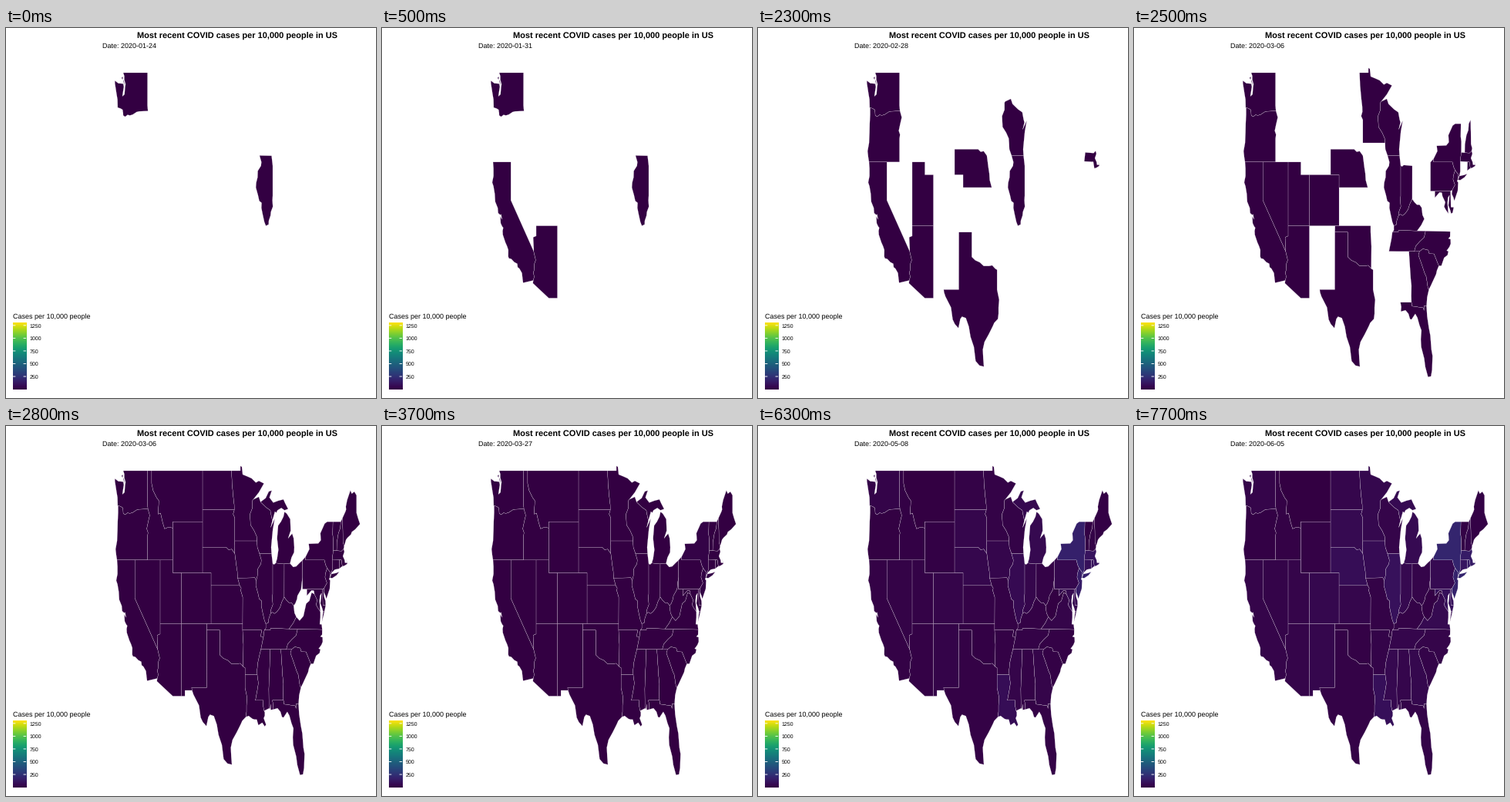
A matplotlib script that plays this animation: 480x480 px, repeating every 8000 ms.

```python
import math

import matplotlib
import matplotlib.pyplot as plt
import numpy as np
from matplotlib.animation import FuncAnimation
from matplotlib.colors import ListedColormap
from matplotlib.patches import Polygon

SIZE, STEP, FRAMES = 480, 100, 80
WEEK_MS, LAST_WEEK, TOP = 400, 19, 1305
START = np.datetime64("2020-01-24")

plt.rcParams["font.family"] = "Liberation Sans"
plt.rcParams["text.hinting"] = "none"
plt.rcParams["text.hinting_factor"] = 1

# viridis, darkened by a display gamma of 2.2 / 1.8
viridis = matplotlib.colormaps["viridis"](np.linspace(0, 1, 512))[:, :3]
cmap = ListedColormap(viridis ** (2.2 / 1.8))

fig = plt.figure(figsize=(SIZE / 72, SIZE / 72), dpi=72, facecolor="white")
ax = fig.add_axes([0, 0, 1, 1])
ax.axis("off")

states = []


def pts(*v):
    """Pairs of degrees west and degrees north."""
    return np.reshape(v, (-1, 2))


def project(p):
    return np.column_stack([183.5 + (117.04 - p[:, 0]) * 5.507,
                            58 + (49 - p[:, 1]) * 16.55])


def add(first, total, mid, *parts, islands=()):
    """A state with its first week, final rate and week of fastest growth."""
    for shape in (np.concatenate(parts), *islands):
        patch = Polygon(project(shape), closed=True, lw=0.2, ec="white", snap=False)
        ax.add_patch(patch)
        states.append((patch, first, total, mid))


def rate(week, total, mid):
    spread = 2 + 0.42 * (mid - 10.5)
    grow = lambda w: math.exp(-math.exp((mid - w) / spread))
    return total * grow(week) / grow(LAST_WEEK)


# Shared borders, mostly rivers
columbia = pts(124.05, 46.27, 123.4, 46.2, 122.9, 46.1, 122.78, 45.85, 122.75, 45.65,
               122.3, 45.55, 121.7, 45.7, 121.2, 45.65, 120.5, 45.72, 119.6, 45.92,
               119, 45.97, 116.92, 46)
snake = pts(116.92, 46, 116.5, 45.5, 116.85, 45, 117.2, 44.45, 116.9, 44.15,
            117.03, 43.83, 117.03, 42)
colorado = pts(114.63, 35, 114.14, 34.3, 114.43, 34.05, 114.53, 33.5, 114.7, 33.35,
               114.5, 33, 114.72, 32.72)
mead = pts(114.63, 35, 114.6, 35.1, 114.75, 36.1, 114.04, 36.2)
bitterroot = pts(116.05, 48, 115.7, 47.45, 114.9, 46.9, 114.35, 46.65, 114.5, 45.6,
                 113.95, 45.68, 113.45, 44.95, 113, 44.45, 112.3, 44.55, 111.5, 44.55,
                 111.05, 44.5)
red_north = pts(97.23, 49, 97.1, 48, 96.83, 47, 96.6, 46.35, 96.56, 45.94)
traverse = pts(96.56, 45.94, 96.85, 45.6, 96.45, 45.3, 96.45, 43.5)
sioux = pts(96.45, 43.5, 96.55, 43.1, 96.45, 42.5)
niobrara = pts(96.45, 42.5, 97.2, 42.85, 97.9, 42.8, 98.5, 43)
missouri = pts(96.45, 42.5, 96.25, 42, 96.1, 41.6, 95.87, 41.1, 95.77, 40.58)
missouri_low = pts(95.3, 40, 94.95, 39.8, 95.05, 39.6, 94.6, 39.1)
red_south = pts(94.48, 33.64, 95.2, 33.9, 95.9, 33.85, 96.6, 33.85, 97.2, 33.85,
                98.1, 34.13, 99.2, 34.3, 100, 34.56)
sabine = pts(94.04, 31.99, 93.55, 31.2, 93.7, 30.6, 93.7, 30.1, 93.85, 29.7)
croix = pts(92.1, 46.75, 92.29, 46.66, 92.29, 46.1, 92.87, 45.6, 92.75, 44.75,
            91.9, 44.3, 91.3, 43.85, 91.22, 43.5)
miss_wi = pts(91.22, 43.5, 91.15, 43, 90.64, 42.51)
miss_ia = pts(90.64, 42.51, 90.2, 42, 90.3, 41.7, 91.05, 41.3, 91.1, 40.8, 91.42, 40.38)
miss_il = pts(91.42, 40.38, 91.5, 40, 91, 39.4, 90.7, 38.95, 90.15, 38.8, 90.2, 38.4,
              89.9, 37.9, 89.5, 37.3, 89.15, 37)
miss_ky = pts(89.15, 37, 89.15, 36.65, 89.5, 36.5)
miss_tn = pts(89.5, 36.5, 89.7, 36, 90.3, 35)
miss_ar = pts(90.3, 35, 90.6, 34.6, 91, 34, 91.2, 33.4, 91.17, 33)
miss_la = pts(91.17, 33, 90.9, 32.35, 91.1, 31.9, 91.6, 31, 89.73, 31, 89.8, 30.6,
              89.55, 30.18)
bootheel = pts(89.7, 36, 90.37, 36, 90.15, 36.5, 94.62, 36.5)
menominee = pts(90.4, 46.55, 89.1, 46.13, 88.1, 45.9, 87.8, 45.35, 87.6, 45.1)
wabash = pts(87.53, 41.71, 87.53, 39.35, 87.6, 39, 87.5, 38.5, 87.95, 38.1, 88.05, 37.8)
ohio_il = pts(88.05, 37.8, 88.45, 37.4, 88.5, 37.1, 89.15, 37)
ohio_in = pts(84.82, 39.1, 85.4, 38.7, 85.8, 38.27, 86.5, 37.95, 87.1, 37.8, 87.6, 37.9,
              88.05, 37.8)
ohio_ky = pts(82.6, 38.42, 83.1, 38.65, 83.7, 38.65, 84.3, 38.85, 84.82, 39.1)
ohio_wv = pts(80.52, 40.64, 80.65, 40.3, 80.85, 39.7, 81.7, 39.2, 81.8, 38.95, 82.2, 38.6,
              82.6, 38.42)
sandy = pts(82.6, 38.42, 82.4, 37.85, 81.97, 37.54)
cumberland = pts(81.97, 37.54, 82.7, 37.05, 83.68, 36.6)
ky_tn = pts(83.68, 36.6, 88.07, 36.65, 88.07, 36.5, 89.5, 36.5)
smoky = pts(81.68, 36.59, 82, 36.1, 83.1, 35.75, 84, 35.4, 84.32, 34.99)
savannah = pts(83.1, 35, 83.35, 34.7, 82.6, 34, 81.9, 33.3, 81.5, 33, 81.1, 32.1,
               80.87, 32.03)
carolina = pts(83.1, 35, 82.3, 35.2, 81.05, 35.1, 80.8, 34.82, 79.68, 34.8, 78.55, 33.86)
tombigbee = pts(88.2, 34.99, 88.1, 34.9, 88.45, 31.9, 88.4, 30.37)
chatta = pts(85.6, 34.99, 85.18, 32.87, 85, 32.3, 85.05, 31.5, 85, 31)
marys = pts(85, 31, 84.86, 30.7, 82.2, 30.57, 82.05, 30.36, 82, 30.75, 81.45, 30.7)
perdido = pts(87.6, 31, 87.4, 30.65, 87.5, 30.28)
allegheny = pts(77.7, 39.32, 78.35, 39.45, 78.9, 38.8, 79.65, 38.58, 80.3, 37.6,
                81.2, 37.25, 81.97, 37.54)
potomac = pts(76.3, 37.95, 77, 38.3, 77.3, 38.5, 77.04, 38.85, 77.7, 39.32)
potomac_wv = pts(77.7, 39.32, 77.85, 39.6, 78.4, 39.62, 79.48, 39.2, 79.48, 39.72)
delaware = pts(74.7, 41.36, 75.1, 40.95, 75.2, 40.65, 74.75, 40.2, 75.4, 39.8)
delaware_up = pts(79.76, 42, 75.35, 42, 75.05, 41.6, 74.7, 41.36)
champlain = pts(73.35, 45, 73.4, 44, 73.25, 43.6, 73.27, 42.75)
taconic = pts(73.27, 42.75, 73.5, 42.05)
ct_ny = pts(73.5, 42.05, 73.5, 41.25, 73.65, 41)
ct_river = pts(71.5, 45, 71.6, 44.5, 72.05, 44.1, 72.4, 43.4, 72.46, 42.73)
merrimack = pts(72.46, 42.73, 71.3, 42.7, 70.82, 42.87)
nh_me = pts(71.08, 45.3, 71, 44.3, 70.97, 43.4, 70.7, 43.08)

# West
add(0, 31, 11.2, pts(117.03, 49, 117.04, 46.43), columbia[::-1],
    pts(124.1, 46.9, 124.35, 47.4, 124.7, 48.15, 124.72, 48.38, 123.9, 48.17, 123.1, 48.15,
        122.75, 48.13, 122.6, 47.9, 122.95, 47.15, 122.45, 47.3, 122.3, 47.9, 122.2, 48.1,
        122.5, 48.45, 122.5, 48.75, 122.75, 49),
    islands=(pts(122.75, 48.4, 122.6, 48.4, 122.4, 47.95, 122.55, 48.1),
             pts(123.15, 48.6, 122.8, 48.7, 122.9, 48.45)))
add(5, 11, 12.5, columbia, snake,
    pts(124.21, 42, 124.4, 42.4, 124.55, 42.85, 124.2, 43.5, 124.1, 44.3, 124.05, 45,
        123.95, 45.7, 123.95, 46.2))
add(1, 32, 14, pts(124.21, 42, 120, 42, 120, 39), colorado,
    pts(117.12, 32.53, 117.25, 32.85, 117.4, 33.3, 118, 33.65, 118.4, 33.75, 118.5, 34.03,
        119.2, 34.15, 119.9, 34.4, 120.47, 34.45, 120.63, 34.6, 120.6, 35.1, 120.9, 35.4,
        121.3, 35.7, 121.9, 36.3, 121.95, 36.6, 121.8, 36.85, 122.05, 36.95, 122.4, 37.2,
        122.5, 37.75, 122.1, 37.5, 122.3, 37.9, 122.5, 37.85, 123, 38, 123.1, 38.4,
        123.7, 38.9, 123.8, 39.5, 124.1, 40.1, 124.4, 40.4, 124.1, 40.9, 124.1, 41.5))
add(6, 30, 12.5, pts(120, 42, 114.04, 42), mead[::-1], pts(120, 39))
add(1, 34, 14.5, pts(114.04, 37, 109.05, 37, 109.05, 31.33, 111.07, 31.33, 114.82, 32.5),
    colorado[::-1], mead)
add(5, 35, 13.8, pts(114.04, 42, 111.05, 42, 111.05, 41, 109.05, 41, 109.05, 37, 114.04, 37))
add(7, 17, 11.5, pts(117.03, 49, 116.05, 49), bitterroot, pts(111.05, 42), snake[::-1],
    pts(117.04, 46.43))
add(7, 5, 11, bitterroot, pts(111.05, 45, 104.05, 45, 104.05, 49, 116.05, 49))
add(7, 16, 12.5, pts(111.05, 45, 104.05, 45, 104.05, 41, 111.05, 41))
add(6, 48, 13, pts(109.05, 41, 102.05, 41, 102.05, 37, 109.05, 37))
add(7, 41, 13.7, pts(109.05, 37, 103, 37, 103.04, 36.5, 103.06, 32, 106.62, 32,
                     106.53, 31.78, 108.21, 31.78, 108.21, 31.33, 109.05, 31.33))

# Plains
add(7, 36, 14, red_north, pts(104.05, 45.94, 104.05, 49))
add(7, 59, 13.5, traverse, sioux, niobrara, pts(104.05, 43, 104.05, 45.94))
add(4, 78, 14.5, niobrara[::-1], missouri, pts(95.3, 40, 102.05, 40, 102.05, 41,
                                               104.05, 41, 104.05, 43))
add(7, 36, 14, missouri_low, pts(94.62, 37, 102.05, 37, 102.05, 40))
add(6, 18, 13, pts(103, 37, 94.62, 37, 94.62, 36.5, 94.43, 35.4), red_south,
    pts(100, 36.5, 103.04, 36.5))
add(3, 25, 13.8, pts(103.04, 36.5, 100, 36.5), red_south[::-1], pts(94.04, 33.55), sabine,
    pts(94.7, 29.4, 95.1, 29.1, 96, 28.5, 97, 27.9, 97.4, 27.3, 97.3, 26.6, 97.15, 25.96,
        98.2, 26.05, 99.1, 26.4, 99.5, 27.5, 100.3, 28.3, 100.7, 29.1, 101.4, 29.77,
        102.3, 29.88, 102.7, 29.7, 103.15, 28.98, 104, 29.3, 104.5, 29.65, 104.9, 30.6,
        106.2, 31.45, 106.53, 31.78, 106.62, 32, 103.06, 32))

# Middle
add(6, 48, 15, red_north[::-1],
    pts(95.15, 49, 95.15, 49.38, 94.8, 49.3, 94.6, 48.7, 93.5, 48.55, 92.5, 48.4,
        91.5, 48.07, 90.8, 48.2, 89.6, 48, 90.8, 47.3), croix, traverse[::-1])
add(7, 67, 14.3, miss_wi, miss_ia, pts(91.73, 40.61), missouri[::-1], sioux[::-1])
add(7, 24, 12.5, pts(95.77, 40.58, 91.73, 40.61), miss_il, miss_ky, bootheel,
    pts(94.62, 37), missouri_low[::-1])
add(7, 29, 14, bootheel, pts(94.43, 35.4, 94.48, 33.64, 94.04, 33.55, 94.04, 33.02),
    miss_ar[::-1])
add(7, 90, 11.1, pts(94.04, 33.02), miss_la,
    pts(89.4, 30.05, 89.4, 29.8, 89.65, 29.6, 89.1, 29.1, 89.4, 28.95, 90, 29.25,
        90.9, 29.05, 91.3, 29.5, 91.8, 29.5, 92.3, 29.55, 93.2, 29.78), sabine[::-1])
add(2, 35, 13.8, croix, miss_wi,
    pts(87.8, 42.49, 87.9, 43, 87.7, 43.7, 87.5, 44.4, 87.05, 45.25, 88, 44.55),
    menominee[::-1], pts(90.8, 46.95))
add(0, 99, 13.3, pts(87.8, 42.49), wabash, ohio_il, miss_il[::-1], miss_ia[::-1])
add(6, 54, 13, wabash[::-1], pts(87.2, 41.65, 86.82, 41.76, 84.81, 41.7), ohio_in)
add(7, 64, 11.4,
    pts(86.82, 41.76, 86.5, 42.1, 86.2, 42.8, 86.5, 43.7, 86.25, 44.7, 85.6, 45, 85, 45.4,
        84.75, 45.78, 84.2, 45.63, 83.4, 45.2, 83.3, 44.3, 83.9, 43.7, 83.4, 43.9,
        82.95, 44.07, 82.6, 43.7, 82.45, 43, 82.5, 42.6, 83.1, 42.2, 83.45, 41.73,
        84.81, 41.7),
    islands=(np.concatenate([menominee, pts(
        87, 45.8, 86.7, 45.7, 86.4, 45.9, 85.5, 46.08, 84.75, 45.9, 83.9, 46, 84.6, 46.45,
        85, 46.75, 86.2, 46.65, 87.4, 46.5, 88.3, 46.9, 87.75, 47.45, 88.45, 47.37,
        89.2, 46.85)]),))
add(7, 32, 13, pts(84.81, 41.7, 83.45, 41.73, 82.7, 41.45, 82, 41.5, 81.2, 41.77,
                   80.52, 41.98), ohio_wv, ohio_ky)
add(6, 24, 13, ohio_ky[::-1], sandy, cumberland, ky_tn, miss_ky[::-1], ohio_il[::-1],
    ohio_in[::-1])
add(6, 37, 13.2, ky_tn, miss_tn, pts(88.2, 34.99), smoky[::-1])

# South
add(7, 56, 13.7, miss_ar, miss_la, tombigbee[::-1])
add(7, 40, 13.7, tombigbee,
    pts(88.15, 30.35, 88, 30.7, 88, 30.25), perdido[::-1], chatta[::-1])
add(6, 47, 12.8, pts(84.32, 34.99), savannah, pts(81.3, 31.4), marys[::-1], chatta[::-1])
add(6, 28, 12.4, perdido[::-1], marys,
    pts(81.3, 29.9, 80.9, 29, 80.55, 28.4, 80.3, 27.3, 80.03, 26.8, 80.15, 25.7, 80.4, 25.2,
        81.1, 25.15, 81.75, 25.95, 82, 26.6, 82.7, 27.5, 82.8, 28.1, 82.65, 28.8,
        83.1, 29.2, 83.6, 29.8, 84.1, 30.1, 85, 29.65, 85.35, 29.7, 85.7, 30.1,
        86.4, 30.38))
add(6, 26, 13, carolina, pts(79, 33.5, 79.2, 33.2, 79.9, 32.7, 80.45, 32.3), savannah[::-1])
add(6, 32, 14.2, smoky, carolina,
    pts(77.95, 33.87, 77.3, 34.5, 76.5, 34.7, 76.3, 35, 76.7, 35.05, 76.05, 35.35,
        75.75, 35.6, 75.8, 35.95, 76.3, 36, 75.9, 36.15, 75.87, 36.55))

# East
add(7, 57, 14, pts(83.68, 36.6, 81.68, 36.59, 75.87, 36.55, 76, 36.95, 76.45, 36.97,
                   76.3, 37.5), potomac, allegheny, cumberland,
    islands=(pts(75.95, 37.15, 75.6, 37.6, 75.3, 38.03, 75.65, 37.95),))
add(8, 12, 12.5, allegheny, sandy[::-1], ohio_wv[::-1], pts(80.52, 39.72),
    potomac_wv[::-1])
add(6, 94, 13.8, pts(75.79, 39.72, 75.7, 38.46, 75.05, 38.45, 75.3, 38.03, 75.65, 37.95,
                     75.9, 38.25, 76.3, 38.6, 76.15, 39, 76.05, 39.4, 76.4, 39.2,
                     76.5, 38.8, 76.4, 38.3), potomac, potomac_wv)
add(7, 100, 13.4, pts(75.79, 39.72, 75.4, 39.8, 75.55, 39.5, 75.4, 39.1, 75.1, 38.8,
                      75.05, 38.45, 75.7, 38.46))
add(6, 62, 12.2, pts(80.52, 41.98, 79.76, 42.27), delaware_up, delaware,
    pts(75.79, 39.72, 80.52, 39.72))
add(6, 184, 11.3, delaware[::-1],
    pts(73.9, 41, 74.05, 40.65, 74.25, 40.5, 74, 40.4, 74.1, 39.75, 74.9, 38.95,
        75.1, 39.2, 75.5, 39.5))
add(6, 194, 10.6, pts(79.76, 42.27, 78.9, 42.85, 79.05, 43.27, 76.8, 43.3, 76.2, 43.55,
                      76.3, 44.1, 75.3, 44.85, 74.7, 45), champlain, taconic, ct_ny,
    pts(74, 40.7, 73.9, 41), delaware_up[::-1],
    islands=(pts(74.03, 40.6, 73.7, 40.9, 72.6, 40.98, 71.87, 41.07, 72.5, 40.8,
                 73.5, 40.58),))
add(7, 16, 10.6, ct_river, champlain[::-1])
add(6, 36, 13.2, ct_river[::-1], nh_me, merrimack[::-1])
add(7, 19, 12.2, nh_me[::-1],
    pts(70.4, 45.8, 70.25, 45.95, 70.3, 46.2, 70, 46.7, 69.23, 47.46, 68.9, 47.2, 68.3, 47.36,
        67.79, 47.07, 67.79, 45.7, 67.45, 45.3, 66.97, 44.82, 68.1, 44.4, 68.9, 44.2,
        69.1, 44, 69.9, 43.75, 70.25, 43.6)[:, :])
add(2, 149, 12.3, taconic[::-1], merrimack,
    pts(70.65, 42.65, 71, 42.3, 70.6, 42, 70.5, 41.78, 70.05, 41.78, 70.2, 42.07,
        69.95, 41.7, 70.65, 41.55, 71.13, 41.5, 71.38, 42.02, 71.8, 42.02))
add(7, 122, 12, pts(71.8, 42.02, 71.85, 41.32, 72.9, 41.25), ct_ny[::-1])
add(6, 146, 12.5, pts(71.8, 42.02, 71.38, 42.02, 71.13, 41.5, 71.4, 41.45, 71.85, 41.32))

# Titles and legend
LEFT, RIGHT, BAR_TOP, BAR_BOTTOM = 8.8, 26.1, 382.2, 468.6
ax.text(300, 13.3, "Most recent COVID cases per 10,000 people in US", size=10.8,
        weight="bold", ha="center")
date = ax.text(124.6, 26, "", size=9)
ax.text(8.6, 377, "Cases per 10,000 people", size=9)
ax.imshow(np.linspace(0, 1, 256)[:, None], cmap=cmap, origin="lower", aspect="auto",
          extent=(LEFT, RIGHT, BAR_BOTTOM, BAR_TOP))
for mark in range(250, 1251, 250):
    y = BAR_BOTTOM - (BAR_BOTTOM - BAR_TOP) * mark / TOP
    for x in (LEFT, RIGHT - 3.5):
        ax.plot([x, x + 3.5], [y, y], color="white", lw=0.9, solid_capstyle="butt",
                snap=False)
    ax.text(30.3, y + 2.7, str(mark), size=7.2)
ax.set_xlim(0, SIZE)
ax.set_ylim(SIZE, 0)


def draw(frame):
    t = frame * STEP
    week, coming = max(0, (t - 1) // WEEK_MS), t // WEEK_MS
    date.set_text(f"Date: {START + 7 * week}")
    for patch, first, total, mid in states:
        patch.set_visible(first <= coming)
        value = (rate(week, total, mid) + rate(coming, total, mid)) / 2
        patch.set_facecolor(cmap(value / TOP))
    return []


anim = FuncAnimation(fig, draw, frames=FRAMES, interval=STEP, repeat=True, repeat_delay=0)
plt.show()
```
